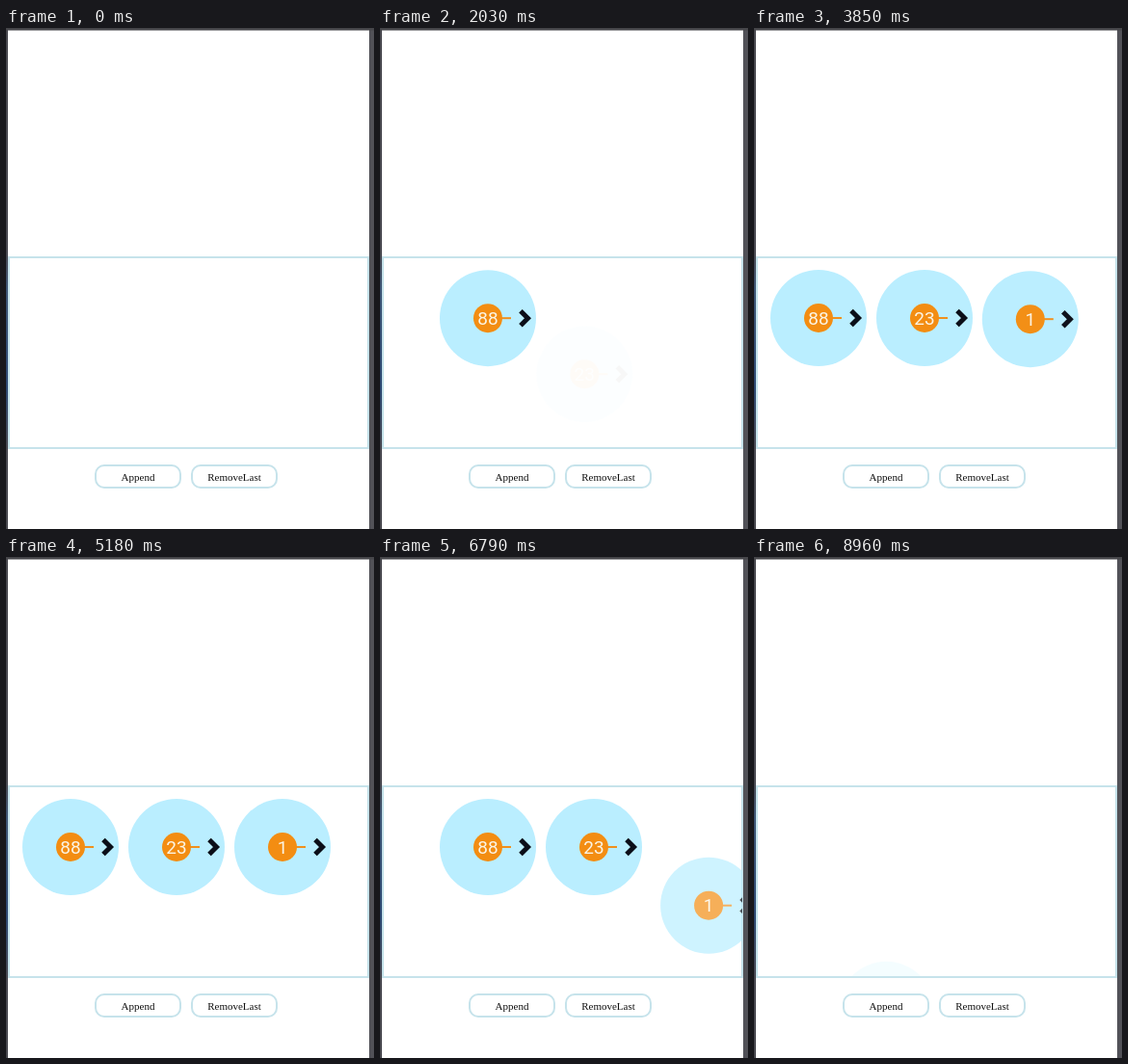
These frames come from a looping animation (382x520 px, 9.1 s). An HTML page:

```html
<!DOCTYPE html>
<html lang="en">
<head>
<meta charset="utf-8">
<title>Linked list</title>
<style>
  html, body { margin: 0; width: 100%; height: 100%; overflow: hidden; background: #fff; }
  svg { display: block; }
  .button { font: 11px "Liberation Serif", "Times New Roman", serif; fill: #111; text-anchor: middle; }
  .value { font: 19px Roboto, "Open Sans", sans-serif; fill: #fbf4e4; text-anchor: middle; }
  .frame { fill: none; stroke: #c6e3eb; stroke-width: 2; }
</style>
</head>
<body>
<svg width="382" height="520" viewBox="0 0 382 520">
  <defs>
    <clipPath id="view"><rect x="3" y="238" width="373" height="197"/></clipPath>
    <linearGradient id="edge" x1="0" y1="0" x2="0" y2="1">
      <stop offset="0" stop-color="#4a4a50"/>
      <stop offset=".45" stop-color="#4a4a52"/>
      <stop offset=".52" stop-color="#3f5878"/>
      <stop offset=".72" stop-color="#2f4b74"/>
      <stop offset=".84" stop-color="#4a4a52"/>
      <stop offset="1" stop-color="#4a4a50"/>
    </linearGradient>
  </defs>
  <rect width="382" height="520" fill="#fff"/>
  <rect width="2" height="520" fill="url(#edge)"/>
  <rect x="377" width="5" height="520" fill="#525258"/>
  <rect width="382" height="2.5" fill="#47474b"/>
  <rect class="frame" x="3" y="238" width="373" height="198"/>
  <g clip-path="url(#view)" id="list"></g>
  <rect class="frame" x="93" y="454" width="88" height="23" rx="9"/>
  <rect class="frame" x="193" y="454" width="88" height="23" rx="9"/>
  <text class="button" x="137" y="470">Append</text>
  <text class="button" x="237" y="470">RemoveLast</text>
</svg>
<script>
const LOOP = 9100, ENTER = 1000, LEAVE = 1000, PITCH = 110, ROW_Y = 301;
const items = [
  { value: 88, add: 1070, remove: 8235 },
  { value: 23, add: 1910, remove: 7375 },
  { value: 1, add: 2950, remove: 6409 },
  { value: 95, add: 5380, remove: 5567, instant: true },
];

const list = document.getElementById('list');
list.innerHTML = items.map(({ value }) => `<g>
  <circle r="50" fill="#baeeff"/>
  <path d="M14 0H24" stroke="#f0901e" stroke-width="2"/>
  <circle r="15" fill="#f38d12"/>
  <path d="M34 -7.5L41.5 0L34 7.5" fill="none" stroke="#0b0e18" stroke-width="5"/>
  <text class="value" y="6.7">${value}</text>
</g>`).join('');
const nodes = [...list.children];

const clamp = x => Math.min(1, Math.max(0, x));

// cubic-bezier(.42, 0, .58, 1)
function easeInOut(x) {
  let lo = 0, hi = 1;
  for (let i = 0; i < 20; i++) {
    const u = (lo + hi) / 2, v = 1 - u;
    if (3 * v * v * u * .42 + 3 * v * u * u * .58 + u * u * u < x) lo = u;
    else hi = u;
  }
  return lo * lo * (3 - 2 * lo);
}

function firstX(t) {
  if (t < 2950 || t >= 6409) return 112;
  return 67 - 49 * easeInOut(clamp((t - 5370) / 190));
}

function draw(now) {
  const t = now % LOOP, x0 = firstX(t);
  items.forEach(({ add, remove, instant }, i) => {
    const shown = t < add ? 0 : instant ? 1 : easeInOut(clamp((t - add) / ENTER));
    const gone = easeInOut(clamp((t - remove) / LEAVE));
    const x = x0 + i * PITCH - 10 * (1 - shown) + 30 * gone;
    const y = ROW_Y + 60 * (1 - shown) + 200 * gone;
    nodes[i].setAttribute('transform', `translate(${x} ${y})`);
    nodes[i].setAttribute('opacity', shown * (1 - gone));
  });
}

const start = performance.now();
function tick() {
  draw(performance.now() - start);
  requestAnimationFrame(tick);
}
tick();
</script>
</body>
</html>
```
